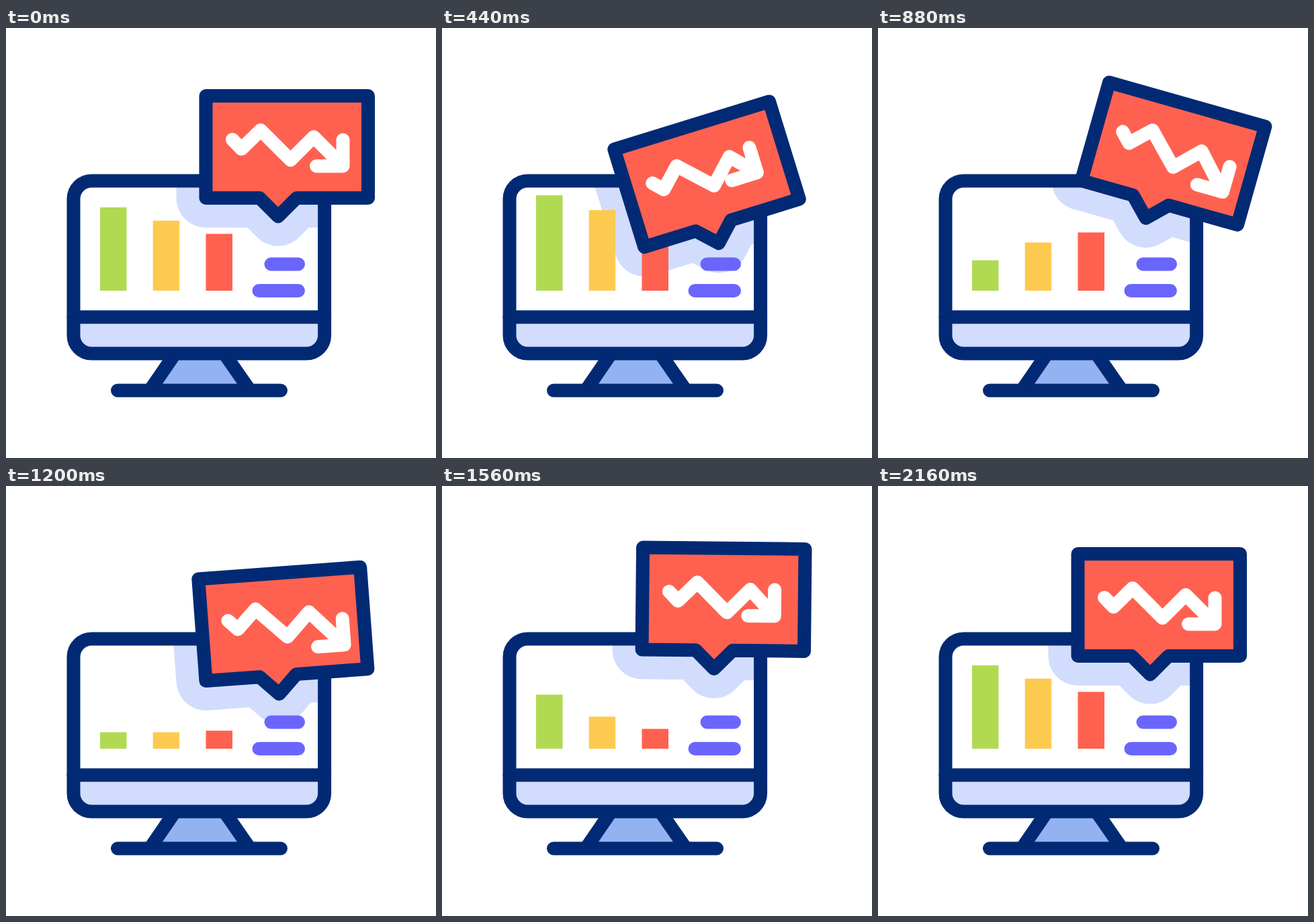
An HTML page for the animation above (2400 ms loop, 640 px wide and 640 px high).

```html
<!DOCTYPE html>
<html>
<head>
<meta charset="utf-8">
<style>
html, body { margin: 0; height: 100%; overflow: hidden; background: #fff; }
svg { display: block; width: 100vw; height: 100vh; }
.line { fill: none; stroke: #022a74; stroke-width: 20; stroke-linejoin: round; stroke-linecap: round; }
</style>
</head>
<body>
<svg viewBox="0 0 640 640">
  <defs>
    <clipPath id="screen"><rect x="105" y="232" width="364" height="193"/></clipPath>
    <path id="bubble" d="M297.5 101H539V253H432.5L405 280.5L377.5 253H297.5Z"/>
  </defs>

  <!-- stand -->
  <path d="M244 490H332L360 535H217Z" fill="#93b2f2"/>
  <path class="line" style="stroke-linecap:butt" d="M250 487L214 539.5M326.6 487L363.1 539.5"/>
  <path class="line" d="M166 539.5H409"/>

  <!-- screen -->
  <path d="M101 431H474V458A27 27 0 0 1 447 484.6H128A27 27 0 0 1 101 458Z" fill="#d2dcfd"/>
  <g clip-path="url(#screen)">
    <use href="#bubble" class="pose" fill="#d2dcfd" stroke="#d2dcfd" stroke-width="88" stroke-linejoin="round"/>
  </g>
  <g id="bars">
    <rect x="140" width="39.5" fill="#b0da52"/>
    <rect x="218.7" width="39.5" fill="#fdca50"/>
    <rect x="297.5" width="39.5" fill="#ff6150"/>
  </g>
  <path class="line" style="stroke:#6b66fb" d="M394.5 351.5H435M376.5 391H435"/>
  <rect class="line" x="100.5" y="227.5" width="373.6" height="257.1" rx="27"/>
  <path class="line" d="M100.5 430.2H474.1"/>

  <!-- speech bubble -->
  <g class="pose">
    <use href="#bubble" class="line" style="fill:#ff6150"/>
    <path id="arrow" class="line" style="stroke:#fff"/>
  </g>
</svg>
<script>
const LOOP = 2400, REST = 2160;
const HALF_SWING = 430;   // time from one tilt extreme to the next
const BAR_DELAY = 115, BAR_LOW = 24.5, BAR_STRETCH = 18;

const ease = u => (1 - Math.cos(Math.PI * Math.min(1, Math.max(0, u)))) / 2;

// Eases through turning points [time, value], starting from 0 at time 0.
function swing(t, turns) {
  let t0 = 0, value = 0, last = 0;
  for (const [t1, v] of turns) {
    value += (v - last) * ease((t - t0) / (t1 - t0));
    [t0, last] = [t1, v];
  }
  return value;
}

const tilt = t => swing(t, [-17.2, 15.9, -6.5, 3.6, 0].map((v, i) => [HALF_SWING * (i + 1), v]));
const lift = t => swing(t, [[445, 41], [665, -39], [1095, 45], [1420, -21], [1770, 15], [2000, -5], [REST, 0]]);
const wobble = t => swing(t, [[440, -11], [1100, 7.5], [1520, -7.5], [1860, 0]]);

// Each bar stretches, drops to a stub and grows back.
function barHeight(rest, t) {
  const drop = rest + BAR_STRETCH - BAR_LOW;
  return rest + BAR_STRETCH * ease((t - 20) / 400)
    - drop * ease((t - 490) / 540)
    + (rest - BAR_LOW) * ease((t - 1210) / 650);
}

const posed = document.querySelectorAll('.pose');
const bars = document.querySelectorAll('#bars rect');
const arrow = document.getElementById('arrow');

function draw(t) {
  const pose = `translate(0 ${lift(t)}) rotate(${tilt(t)} 405 257)`;
  posed.forEach(el => el.setAttribute('transform', pose));

  bars.forEach((bar, i) => {
    const h = barHeight(124 - 19.7 * i, t - BAR_DELAY * i);
    bar.setAttribute('y', 391 - h);
    bar.setAttribute('height', h);
  });

  // The arrow head slides on its own, sagging a little mid-loop.
  const shift = wobble(t), sag = 3.7 * Math.sin(Math.PI * Math.min(1, t / REST));
  const x = 501.5 + shift, y = 205.5 + shift + sag;
  arrow.setAttribute('d',
    `M337 166L350.5 180L379 152L423.5 196.5L458 162L${x} ${y}M${x} ${y - 39}V${y}H${x - 39.5}`);
}

const start = performance.now();
function tick() {
  draw((performance.now() - start) % LOOP);
  requestAnimationFrame(tick);
}
tick();
</script>
</body>
</html>
```
